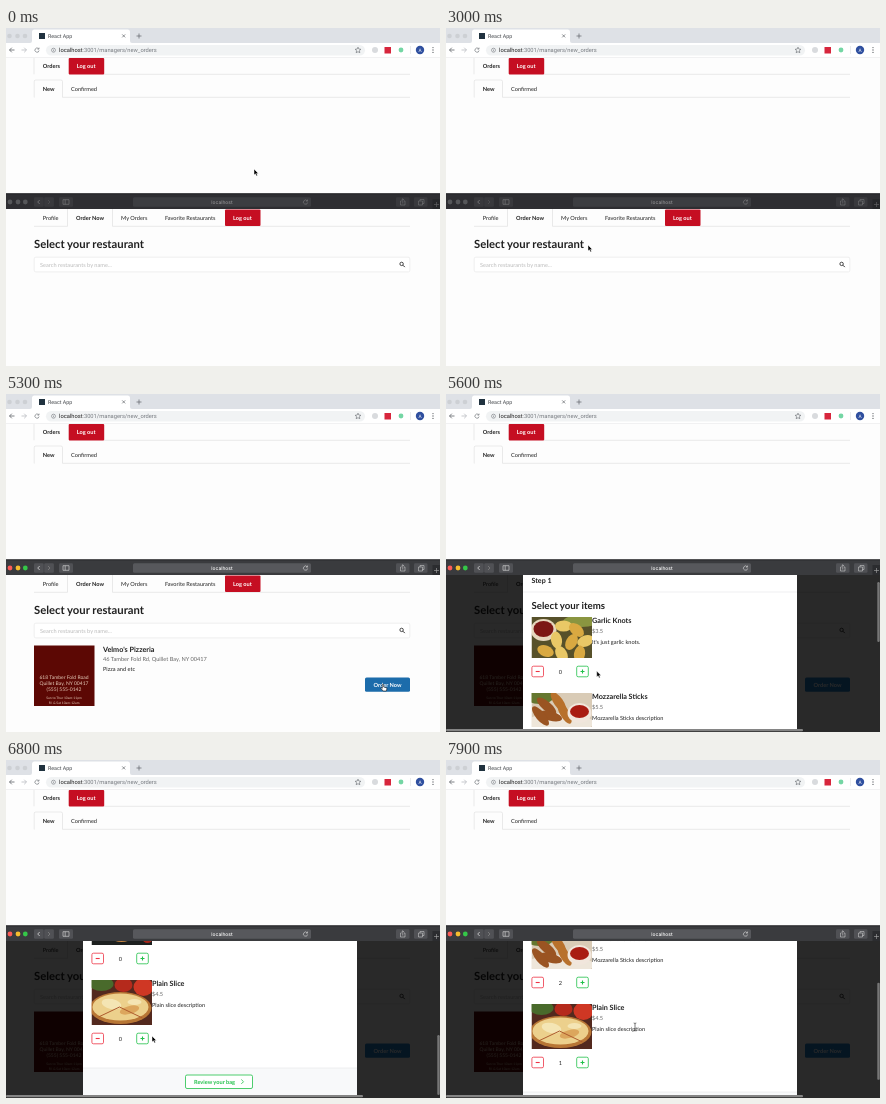
Recreate the animation shown at these times as an HTML page. Size 434 px wide and 338 px high, loop 8000 ms.

```html
<!DOCTYPE html>
<html lang="en">
<head>
<meta charset="utf-8">
<title>Ordering demo</title>
<style>
  html, body { margin: 0; width: 434px; height: 338px; overflow: hidden; background: #fff; }
  svg { display: block; }
  text { font-family: Lato, "Open Sans", sans-serif; white-space: pre; text-rendering: geometricPrecision; }
  .ui { font-family: Roboto, "Liberation Sans", sans-serif; }
  .mac { font-family: Inter, "Liberation Sans", sans-serif; }
</style>
</head>
<body>
<svg id="stage" width="434" height="338" viewBox="0 0 434 338" xmlns="http://www.w3.org/2000/svg"></svg>
<script>
const LOOP = 8000, STEP = 100;
const VIEW_TOP = 181, VIEW_H = 154;
const BASE = 5.64;
const INK = '#202020', GREY = '#666', LINE = '#d4d4d5';
const RED = '#c50e22', MINUS = '#ee3344', GREEN = '#21c04a';

// Drawing helpers
const rect = (x, y, w, h, fill, more = '') =>
  `<rect x="${x}" y="${y}" width="${w}" height="${h}" fill="${fill}" ${more}/>`;
const text = (x, y, s, fill = INK, size = BASE, more = '') =>
  `<text x="${x}" y="${y}" font-size="${size}" fill="${fill}" ${more}>${s}</text>`;
const bold = (x, y, s, fill = INK, size = BASE, more = '') =>
  text(x, y, s, fill, size, `font-weight="700" ${more}`);
const stroke = (d, color, w = .6, more = '') =>
  `<path d="${d}" fill="none" stroke="${color}" stroke-width="${w}" ${more}/>`;
const dot = (x, y, r, fill, more = '') =>
  `<circle cx="${x}" cy="${y}" r="${r}" fill="${fill}" ${more}/>`;
const oval = (x, y, rx, ry, fill, turn = 0) =>
  `<ellipse cx="${x}" cy="${y}" rx="${rx}" ry="${ry}" fill="${fill}" transform="rotate(${turn} ${x} ${y})"/>`;
const middle = 'text-anchor="middle"';
const show = (id, on) => document.getElementById(id).setAttribute('display', on ? 'inline' : 'none');

// Menu with one active tab; x0..x1 is that tab
const tabLine = (x0, x1, top, y) =>
  stroke(`M28 ${y}H${x0}V${top + 1.5}q0 -1.5 1.5 -1.5H${x1 - 1.5}q1.5 0 1.5 1.5V${y}H404`, LINE, .5);
const logOut = (x, y) =>
  rect(x, y, 35.5, 16.5, RED, 'rx="1"') + bold(x + 8, y + 10, 'Log out', '#fff');
const reload = (x, y, color) =>
  stroke(`M${x + 1.6} ${y - 1.3}A2.1 2.1 0 1 0 ${x + 2.1} ${y + .5}M${x + 2} ${y - 2.4}v1.5h-1.5`, color);

function topWindow() {
  const ink = '#5f6368';
  return rect(0, 0, 434, 166, '#fdfdfd') + rect(0, 0, 434, 15, '#dee1e6') +
    [3.5, 11.5, 19].map(x => dot(x, 8, 2.3, '#cdd0d4')).join('') +
    `<path d="M24 15q2 0 2 -2V4q0 -2.5 2.5 -2.5H121.500q2.500 0 2.500 2.500V13q0 2 2 2Z" fill="#fff"/>` +
    rect(33, 5, 6, 6, '#20323f') +
    text(42, 10, 'React App', '#45494d', 5.3, 'class="ui"') +
    stroke('M116.200 6.400l3 3m0 -3l-3 3M133 5.500v5m-2.500 -2.500h5', ink, .7) +
    rect(0, 15, 434, 14.500, '#fff') + rect(40, 17, 319, 10.500, '#f1f3f4', 'rx="5.2"') +
    stroke('M8.500 22H3.500m2.300 -2.300L3.500 22l2.300 2.300', ink, .8) +
    stroke('M15.500 22h5m-2.300 -2.300l2.300 2.300l-2.300 2.300', '#b9bcc0', .8) +
    reload(31, 22, ink) +
    `<circle cx="47.500" cy="22.200" r="2" fill="none" stroke="${ink}" stroke-width=".5"/>` +
    stroke('M47.500 22v1.200M47.500 21v.5', ink, .5) +
    text(53, 24.200, 'localhost<tspan fill="#777b80">:3001/managers/new_orders</tspan>', '#222', 5.75, 'class="ui"') +
    stroke('M352 19.200l.9 1.900l2 .2l-1.500 1.400l.4 2l-1.800 -1l-1.800 1l.4 -2l-1.500 -1.400l2 -.2Z', ink, .6) +
    dot(369, 22, 3, '#d9dbde') + rect(378.500, 19, 6.500, 6.500, '#d7263d') +
    dot(395, 22, 2.400, '#74d6a4') + stroke('M404.500 18v8', '#d5d7da', .5) +
    dot(414, 22, 4.200, '#2f4f9f') + text(414, 23.800, 'A', '#fff', 4.800, `class="ui" ${middle}`) +
    [19.600, 22, 24.400].map(y => dot(427, y, .65, ink)).join('') +
    stroke('M0 29.500H434', '#e2e3e5', .5) +
    stroke('M28 30V46.300M98 46.300H404', LINE, .5) +
    bold(36.700, 40.200, 'Orders') + logOut(62.700, 30) +
    tabLine(28.200, 56.500, 52, 69.300) + bold(36.700, 62.700, 'New') + text(65, 62.700, 'Confirmed');
}

function titleBar() {
  const tile = (x, w) => rect(x, 169.300, w, 9.400, '#505155', 'rx="1.3"');
  return rect(0, 165.500, 434, 15.500, '#3a3b3e') + stroke('M0 165.800H434', '#1d1e20', .8) +
    tile(28, 9.700) + tile(38.200, 9.700) + tile(53, 14) + tile(390, 13.500) + tile(408, 13.500) +
    stroke('M33.700 172l-2 2l2 2', '#eee', .7) + stroke('M42 172l2 2l-2 2', '#888', .7) +
    stroke('M57 171.700h6v4.600h-6ZM59.200 171.700v4.600', '#ddd') +
    stroke('M395.500 173h-1v4h4.500v-4h-1M396.750 175.500v-4.700m-1.300 1.300l1.300 -1.300l1.300 1.300', '#ddd', .5) +
    stroke('M412.500 173h4v4h-4ZM414 173v-1.500h4v4h-1.500', '#ddd', .5) +
    rect(426.500, 171, 8, 10, '#2b2c2f') + stroke('M430.500 174v5m-2.500 -2.500h5', '#aaa') +
    rect(127, 169.300, 178, 9.400, '#57585c', 'rx="1.5"') +
    text(216, 176, 'localhost', '#fff', 4.900, `class="mac" font-weight="500" ${middle}`) +
    reload(299.500, 174, '#ddd') +
    `<rect id="inactive" y="165.500" width="434" height="15.500" fill="#222327" opacity=".5"/>` +
    `<g id="lightsOff">${[4, 12, 19.300].map(x => dot(x, 174, 2.400, '#56575a')).join('')}</g>` +
    `<g id="lightsOn">${dot(4, 174, 2.400, '#fc5b57')}${dot(12, 174, 2.400, '#f5bd2e')}${dot(19.300, 174, 2.400, '#34c748')}</g>`;
}

function shopPage() {
  const sign = (y, s, size) => text(58, y, s, '#e6cdbb', size, middle);
  return rect(0, 181, 434, 157, '#fdfdfd') +
    text(36.700, 192.200, 'Profile') + tabLine(61.500, 106.500, 179, 198.300) +
    bold(70, 192, 'Order Now') + text(115, 192.200, 'My Orders') +
    text(159, 192.200, 'Favorite Restaurants') + logOut(219, 181.500) +
    bold(28, 220, 'Select your restaurant', INK, 11.280) +
    `<rect id="field" x="28.200" y="229.200" width="375.600" height="14.700" rx="1.600" fill="#fff" stroke="#dedede" stroke-width=".5"/>` +
    text(34, 238.500, '', '#bbb', BASE, 'id="query"') +
    rect(34, 233.500, .5, 6.500, '#222', 'id="caret"') +
    `<circle cx="395.600" cy="235.900" r="1.700" fill="none" stroke="#333" stroke-width=".9"/>` +
    stroke('M396.900 237.200l1.900 1.900', '#333', 1) +
    `<g id="result">` + rect(28, 251.500, 60.500, 60.500, '#5c0804') +
    sign(285, '618 Tamber Fold Road', 5) + sign(291.200, 'Quillet Bay, NY 00417', 5) +
    sign(297.400, '(555) 555-0142', 5) +
    sign(305, 'Sun to Thur 10am-11pm', 3.300) + sign(309.500, 'Fri &amp; Sat 10am-12am', 3.300) +
    bold(97, 257.600, "Velmo's Pizzeria", INK, 7.240) +
    text(97, 267, '46 Tamber Fold Rd, Quillet Bay, NY 00417', GREY) + text(97, 277.200, 'Pizza and etc') +
    `<rect id="order" x="359" y="283.500" width="45" height="14.300" rx="1.600"/>` +
    bold(381.500, 292.600, 'Order Now', '#fff', BASE, middle) + `</g>`;
}

// Soft pictures, drawn in a box 60.5 wide
const art = {
  garlic: () => rect(0, 0, 61, 41, '#57512a') + oval(50, 4, 18, 6, '#8a9540') + oval(12, 13, 13, 11, '#e6d7bd') +
    oval(12, 12, 10, 8, '#7c1714') +
    [[32, 9], [45, 13], [25, 23], [40, 25], [54, 24], [14, 34], [30, 37], [48, 37]]
      .map(([x, y], i) => oval(x, y, 8.500, 5.500, i % 2 ? '#d9a941' : '#e9c866', i * 40)).join(''),
  sticks: () => rect(0, 0, 61, 34, '#d9cbb6') + oval(8, 4, 14, 7, '#65772f') + oval(28, 30, 34, 10, '#eee6da') +
    [[15, 13, 40], [27, 9, 55], [19, 23, 15], [33, 20, 60], [9, 23, 50]]
      .map(([x, y, a], i) => oval(x, y, 12, 4.600, i % 2 ? '#b8712c' : '#9a5422', a)).join('') +
    oval(48, 20, 12, 10, '#f1e6dc') + oval(48, 18.500, 9.500, 6.500, '#a91c12'),
  pepperoni: () => rect(0, 0, 61, 40, '#1d201f') + oval(6, 7, 6, 4, '#4d6532') + oval(56, 34, 5, 4, '#a8271b') +
    oval(30, 20, 18, 17, '#c68542') + oval(30, 20, 15.500, 14.500, '#e2a34e') +
    [0, 1, 2, 3, 4, 5, 6].map(i => dot(30 + 10 * Math.cos(i * .9), 20 + 9 * Math.sin(i * .9), 2.800, '#b0301c')).join('') +
    dot(30, 20, 2.800, '#b0301c') + stroke('M17 11L43 29M30 4V36', '#8a4a20', .7),
  plain: () => rect(0, 0, 61, 45, '#53291e') + oval(10, 4, 12, 7, '#496a2b') + oval(32, 5, 9, 7, '#b52a1c') +
    oval(52, 7, 10, 9, '#cf3724') + oval(29, 28, 31, 16, '#b87635') + oval(29, 27, 28, 13.500, '#ecd08c') +
    oval(20, 24, 10, 5, '#f4e5b4', 12) + oval(38, 30, 10, 4, '#dca65d', -15) + oval(43, 22, 7, 3, '#f4e5b4') +
    stroke('M28 27L7 37M28 27L51 38', '#ad5a2d', 1)
};
const dishes = {
  garlic: ['Garlic Knots', '$3.5', "It's just garlic knots.", 41],
  sticks: ['Mozzarella Sticks', '$5.5', 'Mozzarella Sticks description', 34],
  pepperoni: ['Pepperoni Slice', '$3.5', 'Pepperoni slice description', 40],
  plain: ['Plain Slice', '$4.5', 'Plain slice description', 45]
};

function counter(key, n, y, hot) {
  const box = (x, color, fill) =>
    rect(x, y - 5.300, 11.600, 10.600, fill, `rx="1.500" stroke="${color}" stroke-width=".8"`);
  return box(85.900, MINUS, '#fff') + stroke(`M89.700 ${y}h4`, MINUS, 1.100) +
    text(114.500, y + 2, n, INK, BASE, middle) +
    box(130.700, GREEN, hot ? GREEN : '#fff') +
    stroke(`M134.500 ${y}h4m-2 -2v4`, hot ? '#fff' : GREEN, 1.100);
}

function modal(keys, head, title, action, qty, hot) {
  let y = 223, body = '';
  for (const key of keys) {
    const [name, price, about, h] = dishes[key];
    body += `<svg x="85.500" y="${y}" width="60.500" height="${h}"><g filter="url(#soft)">${art[key]()}</g></svg>` +
      bold(146, y + 6.300, name, INK, 7.240) + text(146, y + 16.300, price, GREY) +
      text(146, y + 26.600, about) + counter(key, qty[key] || 0, y + h + 13.500, hot === key);
    y += h + 35;
  }
  const foot = y + 8;
  return rect(77, 173, 274, foot + 27 - 173, '#fff', 'rx="1.600"') +
    bold(85.500, 189, head, INK, 7.100) + stroke('M77 198H351', '#dfdfe0', .5) +
    bold(85.500, 215, title, INK, 9.670) + body +
    rect(77, foot, 274, 27, '#f8f9fa') + stroke(`M77 ${foot}H351`, '#dfdfe0', .5) +
    rect(179.500, foot + 7, 67, 13.500, '#fff', `rx="1.500" stroke="${GREEN}" stroke-width=".8"`) +
    bold(188, foot + 15.800, action, GREEN) +
    stroke(`M235.300 ${foot + 11.500}l2.200 2.200l-2.200 2.200`, GREEN, .8);
}

const shapes = {
  arrow: `<path d="M0 0V6L1.400 4.800L2.400 7L3.500 6.500L2.600 4.400H4.400Z" fill="#000" stroke="#fff" stroke-width=".5"/>`,
  hand: `<path d="M-.7 .6q.7 -1 1.400 0V3l2.600 .7q.8 .3 .6 1.200L3.300 7H.2L-2.200 4.300q.2 -.9 1.500 0Z" fill="#fff" stroke="#111" stroke-width=".6"/>`,
  beam: stroke('M-1.300 -4q1.300 0 1.300 .8V3.200q0 .8 1.300 .8M1.300 -4q-1.300 0 -1.300 .8M0 3.200q0 .8 -1.300 .8', '#222', .6),
  none: ''
};

// Rows: time, x, y, pointer shape from then on
const pointer = [
  [0, 248, 141, 'arrow'], [2900, 248, 141, 'arrow'], [3000, 142, 217, 'arrow'], [3100, 143, 228, 'arrow'],
  [3200, 145, 238, 'beam'], [3400, 146, 243, 'beam'], [3900, 146, 243, 'none'], [4500, 150, 244, 'arrow'],
  [4700, 230, 262, 'arrow'], [4900, 335, 285, 'arrow'], [5000, 368, 290, 'hand'], [5300, 377, 290, 'hand'],
  [5400, 370, 290, 'arrow'], [5500, 255, 284, 'arrow'], [5600, 150.700, 277, 'arrow'], [5900, 149, 276, 'arrow'],
  [6000, 140, 275, 'hand'], [6400, 142, 275, 'hand'], [6500, 148, 274, 'arrow'], [6800, 146, 276, 'arrow'],
  [6900, 137, 277, 'hand'], [7100, 137, 277, 'hand'], [7200, 160, 280, 'arrow'], [7300, 186.800, 282.500, 'arrow'],
  [7400, 204, 311, 'arrow'], [7500, 212, 321, 'hand'], [7600, 212, 321, 'hand'], [7700, 203, 300, 'arrow'],
  [7900, 189, 267, 'beam']
];
const scroll = [
  [5400, 0], [5500, 6], [5600, 18], [5700, 46], [5800, 73], [5900, 89.500], [6400, 89.500], [6500, 112],
  [6600, 162], [6700, 215], [6800, 241], [7500, 241], [7600, 90], [7700, 90], [7800, 80], [7900, 66]
];

function sample(rows, t) {
  let i = 0;
  while (i < rows.length - 1 && rows[i + 1][0] <= t) i++;
  const a = rows[i], b = rows[i + 1] || a;
  const k = b === a ? 0 : Math.max(0, (t - a[0]) / (b[0] - a[0]));
  return a.slice(1).map((v, j) => typeof v === 'number' ? v + (b[j + 1] - v) * k : v);
}
const within = (t, a, b) => t >= a && t < b;

stage.innerHTML =
  `<defs><filter id="soft" x="0" y="0" width="1" height="1"><feGaussianBlur stdDeviation=".6"/></filter></defs>` +
  topWindow() + shopPage() + titleBar() +
  `<g id="overlay">${rect(0, 181, 434, 157, '#000', 'opacity=".84"')}` +
  `<svg x="0" y="${VIEW_TOP}" width="434" height="${VIEW_H}" viewBox="0 ${VIEW_TOP} 434 ${VIEW_H}"><g id="sheet"></g></svg>` +
  rect(0, 335, 357, 2.200, '#858585', 'rx="1"') +
  rect(431.300, 181, 2.400, 60, '#777', 'id="thumb" rx="1.200"') + `</g><g id="pointer"></g>`;

const get = id => document.getElementById(id);

function drawModal(t) {
  const review = t >= 7600;
  const qty = { sticks: (t >= 6100) + (t >= 6300), plain: +(t >= 7000) };
  const hot = within(t, 6000, 6500) ? 'sticks' : within(t, 6900, 7200) ? 'plain' : '';
  const [top] = sample(scroll, t);
  const ratio = VIEW_H / (review ? 244 : 395);
  get('sheet').innerHTML = review
    ? modal(['sticks', 'plain'], 'Step 2', 'Review your items', 'Place your order', qty, hot)
    : modal(Object.keys(dishes), 'Step 1', 'Select your items', 'Review your bag', qty, hot);
  get('sheet').setAttribute('transform', `translate(0 ${18 - top})`);
  get('thumb').setAttribute('y', VIEW_TOP + top * ratio);
  get('thumb').setAttribute('height', VIEW_H * ratio);
}

function draw(t) {
  const active = t >= 3500, focused = within(t, 3500, 4500), open = t >= 5400;
  show('inactive', !active);
  show('lightsOff', !active);
  show('lightsOn', active);

  const typed = focused && t >= 3900 ? 'velmo'.slice(0, (t - 3800) / 100) : '';
  const query = get('query');
  query.textContent = typed || 'Search restaurants by name...';
  query.setAttribute('fill', typed ? INK : focused ? '#8a8a8a' : '#bbb');
  get('field').setAttribute('stroke', focused ? '#85b7d9' : '#dedede');
  show('caret', focused);
  get('caret').setAttribute('x', 34 + (typed ? query.getComputedTextLength() + .2 : -.4));

  show('result', t >= 4500);
  get('order').setAttribute('fill', within(t, 5000, 5400) ? '#1c6cab' : '#2185d0');
  show('overlay', open);
  if (open) drawModal(t);

  const [x, y, shape] = sample(pointer, t);
  get('pointer').innerHTML = shapes[shape];
  get('pointer').setAttribute('transform', `translate(${x} ${y})`);
}

const start = performance.now();
let last = -1;
function tick() {
  const t = Math.floor(((performance.now() - start) % LOOP) / STEP) * STEP;
  if (t !== last) draw(last = t);
  requestAnimationFrame(tick);
}
tick();
</script>
</body>
</html>
```
